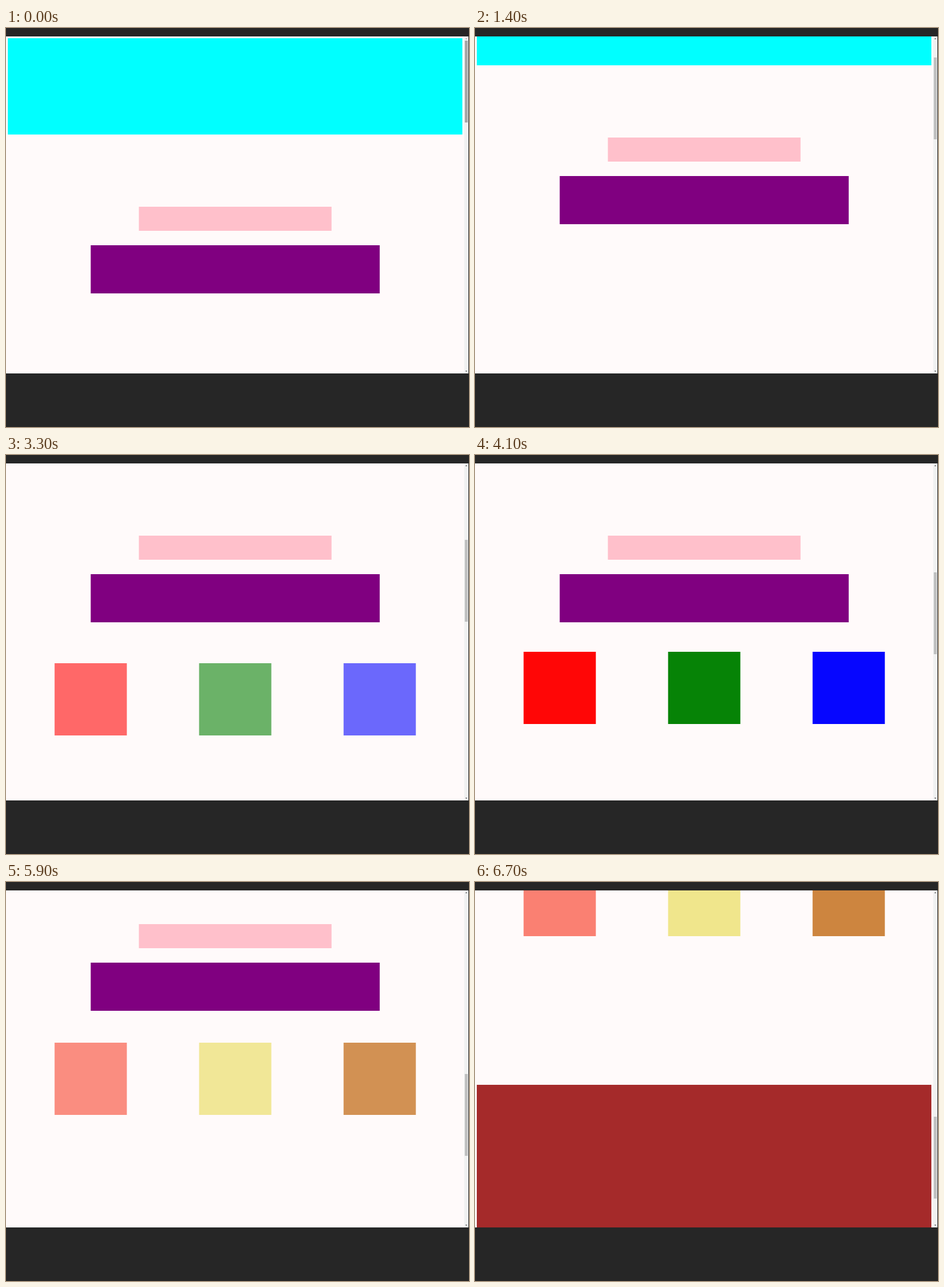
These frames come from a looping animation (769 px wide and 663 px high, 7.9 s). An HTML page with a canvas:

```html
<!DOCTYPE html>
<html lang="en">
<head>
<meta charset="utf-8">
<title>Scroll demo</title>
<style>
html, body { margin: 0; width: 100%; height: 100%; overflow: hidden; background: #262626; }
canvas { display: block; }
</style>
</head>
<body>
<canvas id="stage" width="769" height="663"></canvas>
<script>
const ctx = document.getElementById('stage').getContext('2d');
const LOOP = 7900, STEP = 100;
const TOP = 14, VIEW = 560, CENTER = 380.7;
const PIN = 163, UNPIN = 1163, FADE = 168;
const SETS = [['red', 'green', 'blue'], ['salmon', 'khaki', 'peru']];

// [time in ms, scroll offset in px]
const SCROLL = [
  [0, 0], [800, 0], [1400, 115], [1600, 158], [1900, 226], [2000, 240],
  [2100, 240], [2900, 461], [3000, 478], [3200, 478], [3300, 494],
  [4000, 700], [4200, 729], [4400, 729], [5000, 979], [5100, 987],
  [5200, 987], [5900, 1227], [6000, 1292], [6700, 1519], [LOOP, 1519]
];

function scrollAt(t) {
  const i = SCROLL.findIndex(p => p[0] > t);
  const [t0, s0] = SCROLL[i - 1], [t1, s1] = SCROLL[i];
  return s0 + (s1 - s0) * (t - t0) / (t1 - t0);
}

function rect(color, x, y, w, h) {
  ctx.fillStyle = color;
  ctx.fillRect(x, y, w, h);
}

function arrow(y, dir, color) {
  ctx.fillStyle = color;
  ctx.beginPath();
  ctx.moveTo(763, y);
  ctx.lineTo(766, y);
  ctx.lineTo(764.5, y + 2 * dir);
  ctx.fill();
}

function drawSquares(s) {
  const progress = (s - FADE) / VIEW;
  if (progress <= 0) return;
  const set = progress < 1 ? 0 : 1;
  const alpha = Math.min(progress - set, 1);
  const y = Math.round(373.5 - 48 * alpha - Math.max(0, s - UNPIN));
  ctx.globalAlpha = alpha;
  SETS[set].forEach((color, i) => rect(color, CENTER - 300 + 240 * i, y, 120, 120));
  ctx.globalAlpha = 1;
}

function drawPage(s) {
  const lift = Math.round(Math.min(s, PIN) + Math.max(0, s - UNPIN));
  const y = Math.round(s);
  rect('snow', 0, TOP, 768, VIEW);
  rect('cyan', 3, 17 - y, 755, 160);
  rect('brown', 3, 1856 - y, 755, 400);
  rect('pink', CENTER - 160, 297 - lift, 320, 40);
  rect('purple', CENTER - 240, 361 - lift, 480, 80);
  drawSquares(s);
}

function drawScrollbar(s, t) {
  rect('#f1f1f1', 761, TOP, 7, VIEW);
  rect(t < 100 ? '#a8a8a8' : '#c1c1c1', 762, 21 + Math.round(s / 4.118), 5, 136);
  arrow(18.5, -1, s ? '#505050' : '#a3a3a3');
  arrow(569.5, 1, '#505050');
}

function frame() {
  const now = performance.now() % LOOP;
  const t = Math.floor(now / STEP) * STEP;
  const s = scrollAt(t);
  rect('#262626', 0, 0, 769, 663);
  ctx.save();
  ctx.beginPath();
  ctx.rect(0, TOP, 768, VIEW);
  ctx.clip();
  drawPage(s);
  drawScrollbar(s, t);
  ctx.restore();
  requestAnimationFrame(frame);
}
frame();
</script>
</body>
</html>
```
